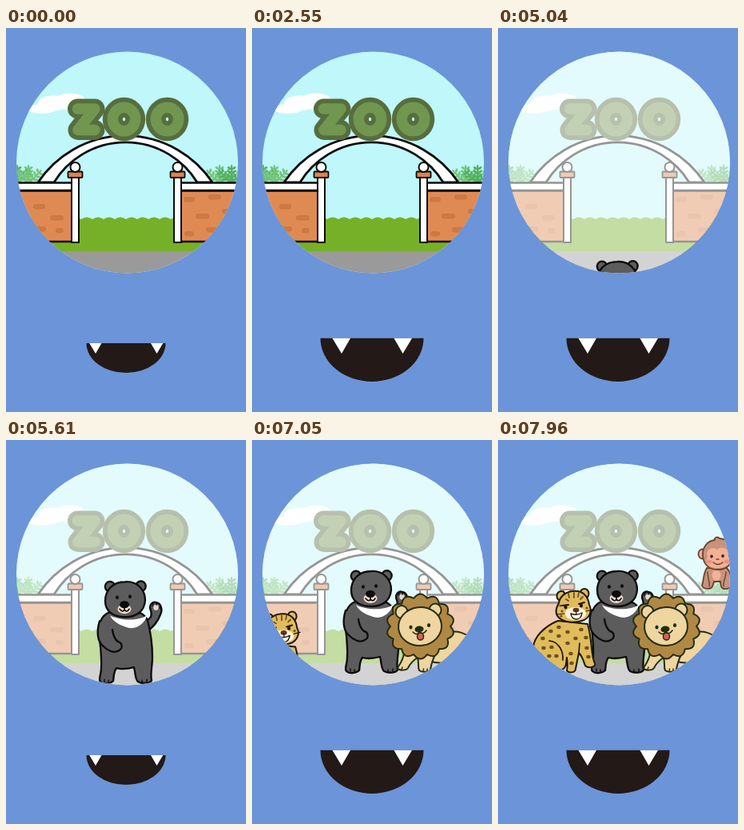
These frames come from a looping animation (300 px wide and 480 px high, 7990 ms). An HTML page with a canvas:

```html
<!DOCTYPE html>
<html lang="en">
<head>
<meta charset="utf-8">
<title>Zoo</title>
<style>
html, body { margin: 0; width: 100%; height: 100%; overflow: hidden; background: #6c94d8; }
canvas { display: block; width: 300px; height: 480px; }
</style>
</head>
<body>
<canvas id="stage" role="img" aria-label="ZOO"></canvas>
<script>
const LOOP = 7990;
const canvas = document.getElementById('stage');
const ctx = canvas.getContext('2d');
const dpr = window.devicePixelRatio || 1;
canvas.width = 300 * dpr;
canvas.height = 480 * dpr;

const INK = '#0c0a0a';
const clamp = v => Math.max(0, Math.min(1, v));

// Time in ms to animation tick; a tick lasts about a thirtieth of a second.
const KEYS = [[0, 0], [4080, 120], [4210, 124], [4710, 140], [4880, 145], [5010, 149], [7990, 248.33]];
function tickAt(ms) {
  let i = 1;
  while (i < KEYS.length - 1 && ms >= KEYS[i][0]) i++;
  const [t0, n0] = KEYS[i - 1], [t1, n1] = KEYS[i];
  return Math.floor(n0 + (n1 - n0) * (ms - t0) / (t1 - t0) + 1e-6);
}

// Share of a slide still to go: 30 ticks, easing out.
const remaining = (tick, start) => (1 - clamp((tick - start) / 30)) ** 2;

function paint(path, fill, stroke, width = 2) {
  if (fill) { ctx.fillStyle = fill; ctx.fill(path); }
  if (stroke) { ctx.strokeStyle = stroke; ctx.lineWidth = width; ctx.stroke(path); }
}
const shape = (d, fill, stroke, width) => paint(new Path2D(d), fill, stroke, width);
function oval(x, y, rx, ry, fill, stroke, width, turn = 0) {
  const p = new Path2D();
  p.ellipse(x, y, rx, ry, turn, 0, 7);
  paint(p, fill, stroke, width);
}
function box(x, y, w, h, fill, stroke, width, radius = 0) {
  const p = new Path2D();
  p.roundRect(x, y, w, h, radius);
  paint(p, fill, stroke, width);
}
function dots(list, rx, ry, fill) {
  for (const [x, y] of list) oval(x, y, rx, ry, fill);
}

function plant(x, y, color) {
  for (const angle of [-0.75, 0, 0.75]) {
    ctx.save();
    ctx.translate(x, y);
    ctx.rotate(angle);
    for (let j = 0; j < 4; j++) {
      for (const side of [-1, 1]) {
        oval(side * 3, -5 * j - 5, 4.6 - j * 0.6, 1.5, color, null, 0, -side * 0.6);
      }
    }
    shape('M0 0 L0 -23', null, color, 2.2);
    ctx.restore();
  }
}

function pillar(x) {
  box(x - 4.5, 187, 9, 81, '#fff', INK, 2);
  box(x - 9, 179.5, 18, 7.5, '#d9844c', INK, 1.8, 1);
  oval(x, 174, 6, 6, '#fff', INK, 2);
}

function wall(x, w, bricks) {
  box(x, 203.5, w, 63.5, '#e08a53', INK, 2.6);
  for (const [bx, by, bw] of bricks) box(bx, by, bw, 6.5, '#cb7945', null, 0, 3);
  box(x, 193.5, w, 9.5, '#fff', INK, 2.6);
}

function sign() {
  const z = new Path2D('M89.5 101 L111 101 L90 127.5 L111 127.5');
  const o = new Path2D();
  for (const x of [147.5, 201.5]) {
    o.moveTo(x + 14.2, 114);
    o.ellipse(x, 114, 14.2, 14.8, 0, 0, 7);
  }
  for (const [color, width] of [['#566e3e', 25], ['#719650', 13.5]]) {
    paint(z, null, color, width);
    paint(o, null, color, width);
  }
}

function scenery() {
  box(10, 25, 285, 285, '#bff7fa');
  oval(45, 101, 18, 6, '#fff');
  oval(59, 94, 19, 9.5, '#fff');
  oval(80, 92, 20, 10.5, '#fff');
  oval(95, 98, 16, 8, '#fff');

  const hill = new Path2D('M10 281 L10 240');
  for (let x = 10; x < 290; x += 14) hill.quadraticCurveTo(x + 7, 234, x + 14, 239);
  hill.lineTo(290, 281);
  paint(hill, '#76b028');
  box(10, 279, 285, 30, '#9a9a9a');

  plant(14, 195, '#55b061');
  plant(28, 195, '#74c67d');
  plant(267, 195, '#74c67d');
  plant(282, 195, '#55b061');

  shape('M40 193 A131 131 0 0 1 258 193 L239 193 A105 105 0 0 0 60 193 Z', '#fff', INK, 2.8);

  wall(-5, 92, [[34, 220, 15], [55, 234, 17], [36, 248, 14], [62, 250, 10], [14, 232, 10]]);
  wall(214, 90, [[222, 211, 14], [253, 208, 16], [237, 232, 17], [270, 226, 14], [223, 254, 12], [250, 249, 15]]);
  pillar(86.5);
  pillar(214.5);
  sign();
}

function bear() {
  const fur = '#5c5c5d', w = 2.3;
  shape('M172 212 C180 213 183 207 181 200 C178 193 183 188 188 190 C194 191 196 199 193 205 C190 213 184 221 176 226 Z', fur, INK, w);
  oval(187.5, 196, 3.2, 3.6, '#e9d9cd');
  shape('M183 194 L184 191 M188 193 L188.5 190 M192 197 L193 194', null, INK, 1.4);
  shape('M129 202 C118 207 117 216 116 226 C118 245 120 258 119 272 C119 281 115 286 118 289 ' +
    'C122 293 131 291 134 288 C135 283 134 277 138 272 C145 274 152 273 160 271 ' +
    'C162 278 161 285 165 289 C171 292 181 291 182 287 C180 280 183 270 183 258 ' +
    'C183 240 180 224 177 212 C174 206 170 204 168 203 Z', fur, INK, w);
  shape('M130 206 C140 212 165 214 176 206 C175 213 166 222 157 222 C147 221 134 215 130 206 Z', '#fff');
  shape('M117 213 C113 226 114 238 121 244 C127 250 135 254 141 250 C147 247 145 240 140 239 C136 236 134 231 133 224', fur, INK, w);
  oval(130, 170, 6.2, 6.4, fur, INK, w);
  oval(168.5, 169.5, 6.2, 6.4, fur, INK, w);
  shape('M149 164 C164 163 174 174 174 187 C173 201 163 208 149 208 C134 208 124 201 124 188 C124 174 134 164 149 164 Z', fur, INK, w);
  oval(148, 198, 8.5, 6, '#f0d9c6');
  oval(148, 192.5, 6, 4.5, INK);
  shape('M148 195 L148 199 M142 198 Q146 203 148 199 Q151 203 154 198', null, INK, 1.6);
  dots([[139, 183.5], [155, 182.5]], 2, 2.3, INK);
  shape('M123 289 L123 286 M128 290 L128 287 M170 290 L170 287 M176 290 L176 286', null, INK, 1.4);
}

function lion() {
  const skin = '#efd5a0', ink = '#222d10';
  shape('M238 243 C254 236 272 240 278 256 L282 290 L260 290 L252 276 C241 280 230 279 220 276 Z', skin, ink);
  shape('M190 266 C189 276 184 281 182 285 C184 289 193 288 195 285 C198 279 202 275 207 272 ' +
    'C209 279 207 284 209 288 C213 291 221 290 223 287 C224 280 226 274 230 266 Z', skin, ink);
  const mane = new Path2D(), bumps = 14;
  for (let i = 0; i <= bumps; i++) {
    const a = i * Math.PI * 2 / bumps, h = a - Math.PI / bumps;
    const x = 210.5 + 37.5 * Math.cos(a), y = 233 + 36 * Math.sin(a);
    if (i) mane.quadraticCurveTo(210.5 + 48 * Math.cos(h), 233 + 46 * Math.sin(h), x, y);
    else mane.moveTo(x, y);
  }
  paint(mane, '#b08844', ink);
  oval(187, 215, 7.5, 8, skin, ink);
  oval(229, 212.5, 7.5, 8, skin, ink);
  oval(210, 233, 27, 24, skin, ink, 2, -0.12);
  dots([[198.5, 234], [221, 231.5]], 2.1, 2.5, ink);
  oval(210.5, 245.5, 4, 4.6, '#d9605a', ink, 1.5);
  oval(209, 236.5, 5.6, 4, ink, null, 0, -0.12);
  shape('M201 240 Q206 245 209.5 240 Q214 244 218 238', null, ink, 1.6);
  shape('M187 287 L188 284 M214 289 L214.5 286 M219 289 L219 286', null, ink, 1.4);
}

function leopard() {
  const fur = '#e0bc5c', spot = '#70501f', ink = '#211608';
  shape('M75 226 C64 230 49 241 45 254 C43 264 49 269 57 274 C59 283 68 290 80 287 ' +
    'C86 285 85 278 86 272 C87 279 87 284 86 288 C88 292 97 291 97 286 L101 266 ' +
    'C106 271 107 277 109 282 C113 286 123 284 121 279 C116 271 118 250 112 230 Z', fur, ink);
  shape('M64 251 C76 252 82 264 81 275 M101 266 L102 254', null, ink, 1.7);
  dots([[56, 248], [66, 239], [76, 234], [76, 245], [87, 240], [57, 260], [67, 259], [73, 270],
    [64, 270], [87, 254], [91, 267], [97, 248], [110, 247], [111, 260], [92, 279], [113, 271], [104, 237]], 2.7, 2.2, spot);
  oval(79, 195, 5.5, 6, fur, ink);
  oval(108, 192, 5.5, 6, fur, ink);
  shape('M93 189 C106 187 113 196 114 206 C118 213 115 223 105 226 C96 229 82 228 76 222 ' +
    'C70 216 73 209 76 204 C77 196 84 190 93 189 Z', fur, ink);
  oval(97, 217, 13, 8, '#fff3dc');
  shape('M88 192 L89 197 M95 191 L95 197 M101 191 L100 196 M85 199 L88 201 M106 196 L103 199', null, spot, 1.8);
  dots([[80, 214], [79, 220], [111, 210], [78, 207]], 1.6, 1.5, spot);
  shape('M80 207 L88 206 M101 205 L108 203', null, ink, 2);
  dots([[84.5, 209], [104, 207]], 2.1, 2.4, ink);
  oval(97.5, 212.5, 4, 2.8, '#5a3622');
  shape('M91 217 Q98 220 105 216 Q104 224 98 224 Q92 224 91 217 Z', '#fff', ink, 1.4);
  shape('M97.5 214 L98 218 M83 217 L74 218 M110 214 L118 212', null, ink, 1.2);
}

function monkey() {
  const fur = '#c8937a', skin = '#f2b095', ink = '#69432f';
  shape('M261 160 C256 168 257 178 255 182 C257 187 266 187 268 183 L270 177 L278 177 ' +
    'C278 182 279 185 282 186 C288 187 293 184 292 179 C292 170 290 164 286 160 Z', fur, ink, 1.8);
  oval(273, 169, 5.5, 7, skin);
  shape('M262 165 C262 173 265 178 264 183 M285 165 C285 172 281 177 282 183', null, ink, 1.4);
  oval(255.5, 142.5, 5, 6, skin, ink, 1.8);
  oval(294, 143, 5, 6, skin, ink, 1.8);
  shape('M271 125 C270 122 274 120 277 123 C289 124 295 134 294 145 C292 157 284 162 275 162 C264 162 257 156 256 145 C255 134 262 126 271 125 Z', fur, ink, 1.8);
  shape('M274 137 C281 131 290 137 288 146 C293 156 284 160 275 160 C265 160 257 155 262 146 C258 138 267 132 274 137 Z', skin);
  dots([[264, 152], [286, 152]], 3.2, 2.4, '#ee8f80');
  dots([[267, 145.5], [281, 145]], 1.8, 2, '#38231a');
  shape('M273 149 L276 149 M269 153 Q275 158 281 153', null, ink, 1.4);
}

function mouth(tick) {
  const step = Math.floor(tick / 5) % 21;
  const [rx, top, depth] = step % 2 ? [64.5, 387.7, 54.3] : step % 4 ? [82, 387.7, 60] : [49.5, 394, 37];
  const p = new Path2D();
  p.ellipse(150, top, rx, depth, 0, 0, Math.PI);
  p.closePath();
  ctx.save();
  ctx.clip(p);
  box(60, 380, 180, 75, '#231917');
  shape('M100 387 L123.5 387 L112 407 Z M177 387 L200.5 387 L188.5 407 Z', '#fff');
  ctx.restore();
}

function slide(dx, dy, draw) {
  ctx.save();
  ctx.translate(dx, dy);
  draw();
  ctx.restore();
}

function render(ms) {
  const tick = tickAt(ms);
  ctx.setTransform(dpr, 0, 0, dpr, 0, 0);
  ctx.lineJoin = ctx.lineCap = 'round';
  ctx.fillStyle = '#6c94d8';
  ctx.fillRect(0, 0, 300, 480);

  ctx.save();
  ctx.beginPath();
  ctx.arc(151.5, 168, 138.5, 0, 7);
  ctx.clip();
  scenery();
  if (tick >= 124) {
    const veil = 0.57 * clamp((tick - 122) / 13);
    box(10, 25, 285, 285, `rgba(255,255,255,${veil})`);
  }
  if (tick > 148) slide(0, 147 * remaining(tick, 148), bear);
  if (tick > 178) slide(140 * remaining(tick, 178), 0, lion);
  if (tick > 208) {
    const left = remaining(tick, 208);
    slide(-118 * left, 58 * left, leopard);
  }
  if (tick > 238) slide(80 * (remaining(tick, 238) - 0.49), 0, monkey);
  ctx.restore();

  mouth(tick);
}

const start = performance.now();
function loop() {
  render((performance.now() - start) % LOOP);
  requestAnimationFrame(loop);
}
loop();
</script>
</body>
</html>
```
